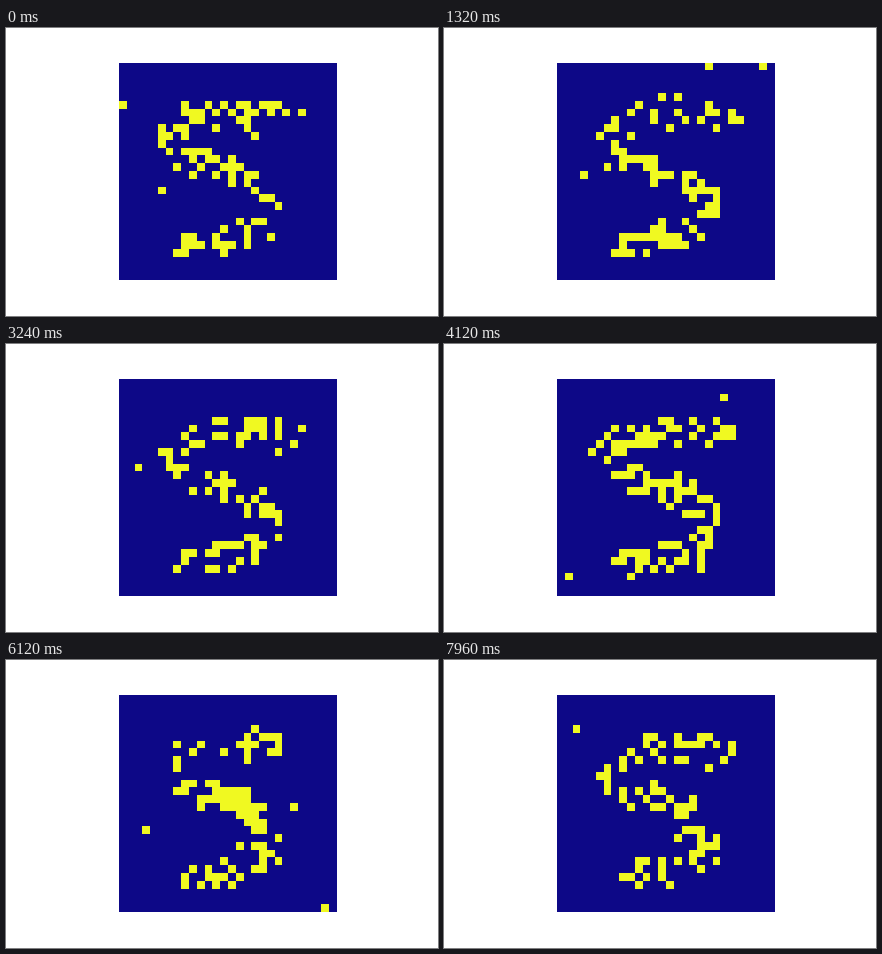
Animation of 432 by 288 pixels, one loop 8 s. Source, as an HTML page with a canvas:

```html
<!DOCTYPE html>
<html lang="en">
<head>
<meta charset="utf-8">
<title>Spiking digit</title>
<style>
  html, body { margin: 0; width: 100%; height: 100%; overflow: hidden; background: #fff; }
  canvas { display: block; width: 432px; height: 288px; }
</style>
</head>
<body>
<canvas width="432" height="288"></canvas>
<script>
const ctx = document.querySelector('canvas').getContext('2d');
const SIZE = 28, SIDE = 218, LEFT = 113, TOP = 34;
const STEP = 40, STEPS = 200;
const PEAK = 0.48, NOISE = 0.005, HALF_WIDTH = 1.65, SHARPNESS = 4;

// Pen stroke of the digit, in cells
const stroke = [
  [21, 6.3], [13, 6.2], [8, 7.2], [6.3, 9.5], [7, 12],
  [11, 12.8], [16, 14.3], [18.8, 17], [19, 19.5], [17, 21.3], [13, 22.6], [8.3, 23.2]
];

function distance(x, y, [ax, ay], [bx, by]) {
  const dx = bx - ax, dy = by - ay;
  const along = ((x - ax) * dx + (y - ay) * dy) / (dx * dx + dy * dy);
  const t = Math.min(1, Math.max(0, along));
  return Math.hypot(x - ax - t * dx, y - ay - t * dy);
}

// Chance that a cell fires: high on the stroke, falling off at its rim
function firingRate(col, row) {
  const gaps = stroke.slice(1).map((end, i) => distance(col, row, stroke[i], end));
  const rim = Math.min(...gaps) - HALF_WIDTH;
  return NOISE + PEAK / (1 + Math.exp(SHARPNESS * rim));
}

const rates = Array.from({ length: SIZE * SIZE },
  (_, i) => firingRate(i % SIZE, Math.floor(i / SIZE)));

// Nearest pixel, with halves rounded down
const edge = (start, cell) => Math.ceil(start + cell * SIDE / SIZE - 0.5);

function fillCells(col, row, span, color) {
  const x = edge(LEFT, col), y = Math.max(TOP + 1, edge(TOP, row));
  ctx.fillStyle = color;
  ctx.fillRect(x, y, edge(LEFT, col + span) - x, edge(TOP, row + span) - y);
}

function seededRandom(seed) {
  return () => {
    seed = (seed + 0x6D2B79F5) | 0;
    let t = Math.imul(seed ^ (seed >>> 15), 1 | seed);
    t = (t + Math.imul(t ^ (t >>> 7), 61 | t)) ^ t;
    return ((t ^ (t >>> 14)) >>> 0) / 4294967296;
  };
}

function draw(step) {
  const random = seededRandom(Math.imul(step + 1, 0x9E3779B1));
  fillCells(0, 0, SIZE, '#0d0887');
  rates.forEach((rate, i) => {
    if (random() < rate) fillCells(i % SIZE, Math.floor(i / SIZE), 1, '#f0f921');
  });
}

const start = performance.now();
let shown = -1;
function tick() {
  const step = Math.floor((performance.now() - start) / STEP) % STEPS;
  if (step !== shown) draw(shown = step);
  requestAnimationFrame(tick);
}
tick();
</script>
</body>
</html>
```
